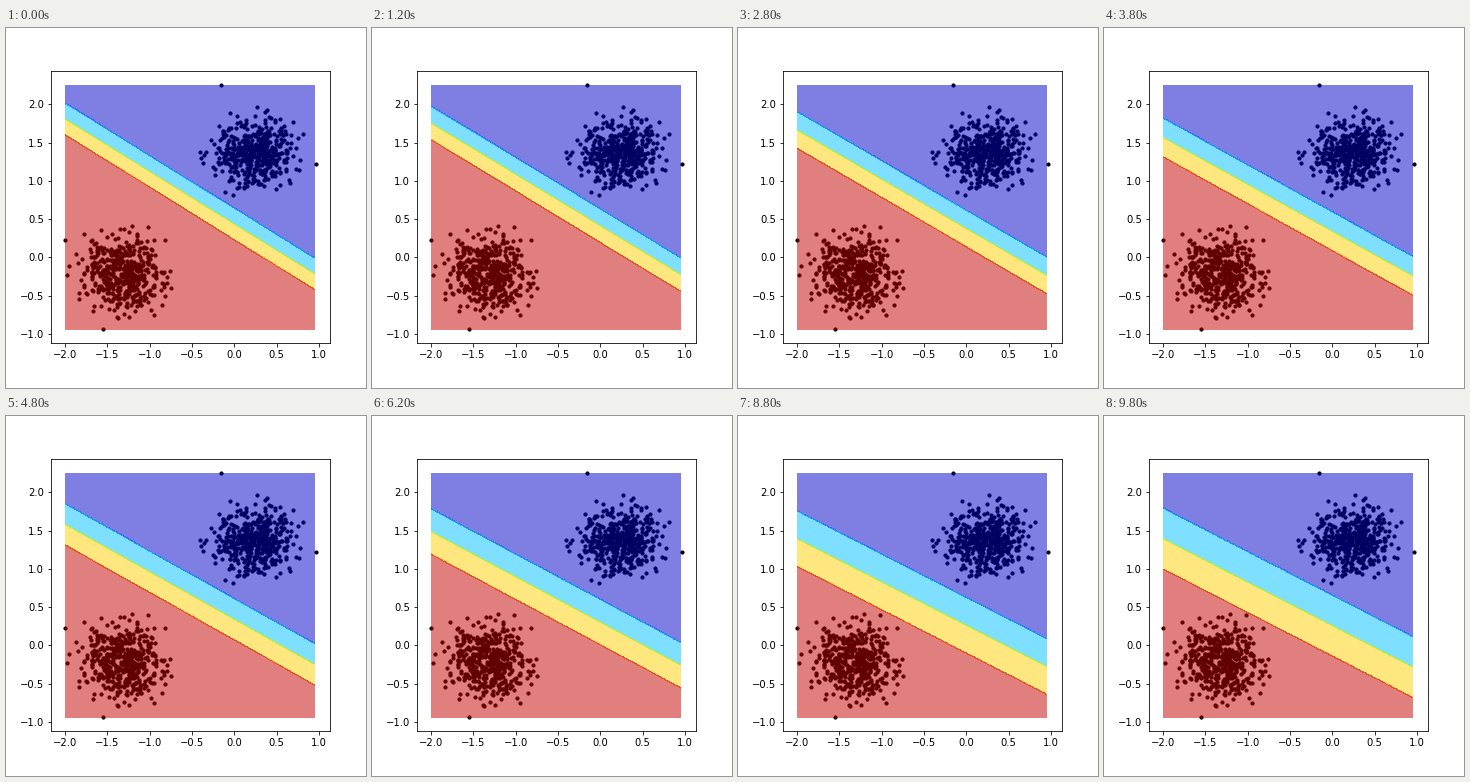
These frames come from a looping animation (360 px wide and 360 px high, 10000 ms). A matplotlib script:

```python
import numpy as np
import matplotlib.pyplot as plt
from matplotlib.animation import FuncAnimation

FRAMES, STEP_MS = 50, 200
X0, Y0, X_UNIT, Y_UNIT = 228.3, 229.45, 84.57, 76.6  # origin and scale in pixels
X_LEFT, X_RIGHT = -2.0, 0.95
Y_LOW, Y_HIGH = -0.94, 2.25
MESH = 0.01

rng = np.random.default_rng(11)


def blob(cx, cy, spread, n=500, limit=2.9):
    """Gaussian cloud without its far tail."""
    z = rng.normal(size=(n, 2))
    z = z[np.hypot(*z.T) < limit]
    return z * spread + (cx, cy)


outermost = [(-2.0, 0.225), (-1.55, -0.94), (-0.155, 2.25), (0.97, 1.22)]
points = np.vstack([blob(-1.33, -0.2, 0.235), blob(0.23, 1.37, 0.225),
                    outermost])

xx, yy = np.meshgrid(np.arange(X_LEFT, X_RIGHT + MESH / 2, MESH),
                     np.arange(Y_LOW, Y_HIGH, MESH))

fig = plt.figure(figsize=(5, 5), dpi=72, facecolor="white")
ax = fig.add_axes([0.125, 0.125, 0.775, 0.755])
ax.set_xlim((45 - X0) / X_UNIT, (324 - X0) / X_UNIT)
ax.set_ylim((Y0 - 315) / Y_UNIT, (Y0 - 43.2) / Y_UNIT)
ax.set_xticks(np.arange(-2, 1.1, 0.5))
ax.set_yticks(np.arange(-1, 2.1, 0.5))
ax.scatter(*points.T, s=10, c="black")

regions = None


def top_edge(i):
    """Left end of the top boundary in pixels: slow drift with periodic kicks."""
    phase = (i - 7) % 12 / 11
    kick = 8 * min(1, i / 7) * (1 - phase)
    return 75 + 0.88 * i ** 0.7 + kick


def classes(i):
    """Class map: three parallel boundaries that spread as the weights shrink."""
    gap = 1 / (0.0632 - 0.00062 * i)
    left = top_edge(i) + gap
    right = 245.7 + 0.105 * i
    t = (xx - X_LEFT) / (X_RIGHT - X_LEFT)
    depth = Y0 - yy * Y_UNIT - left - (right - left) * t
    return sum((depth > k * gap).astype(float) for k in (-1, 0, 1))


def draw(i):
    global regions
    if regions is not None:
        regions.remove()
    # The small stretch keeps whole classes off the level edges
    regions = ax.contourf(xx, yy, classes(i) * 1.01, levels=np.arange(9) * 0.4,
                          cmap="jet", alpha=0.5)
    return [regions]


def reset():
    return draw(0)


anim = FuncAnimation(fig, draw, frames=FRAMES, init_func=reset,
                     interval=STEP_MS, repeat=True, repeat_delay=0, blit=False)
plt.show()
```
